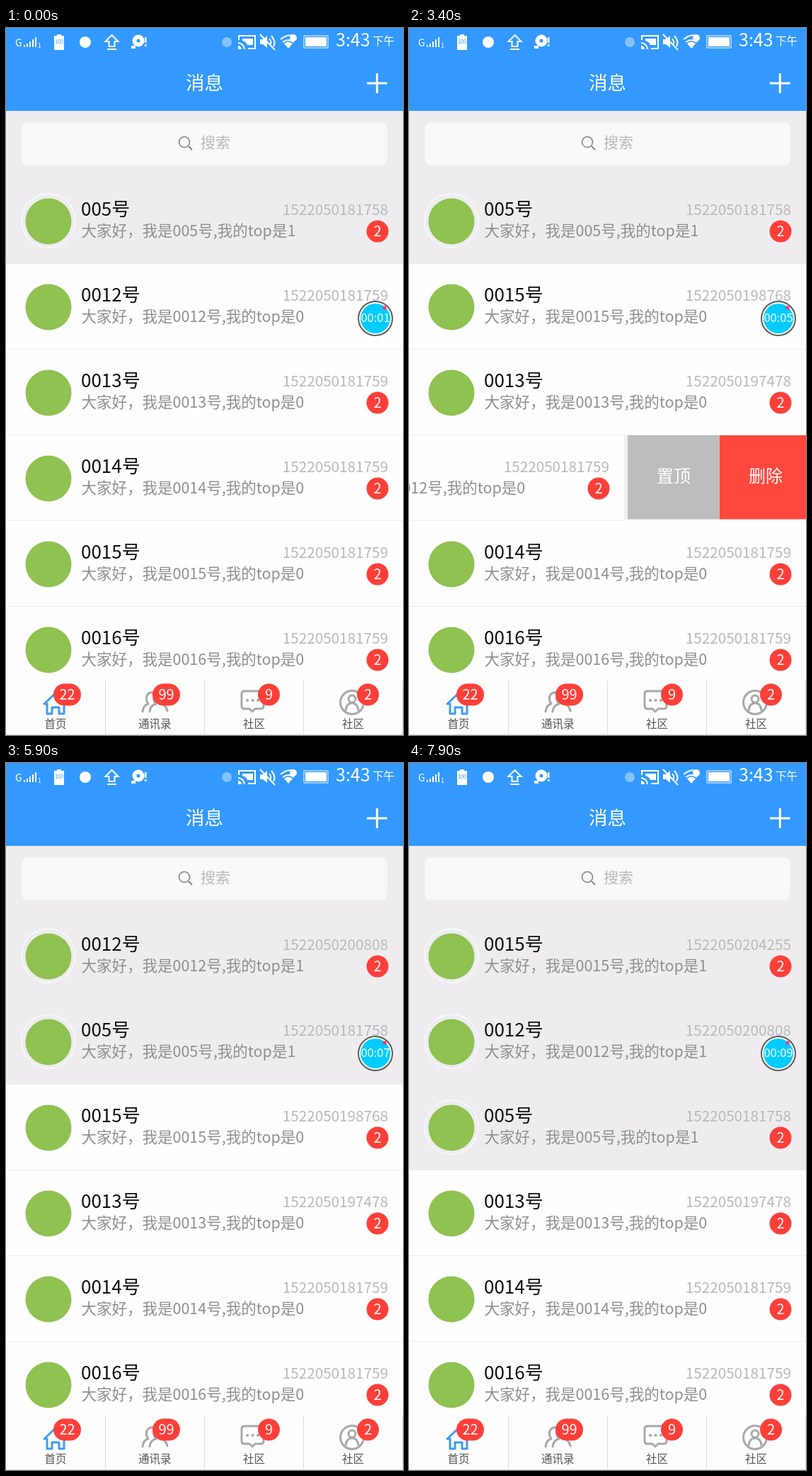
An HTML page that plays this animation: 561x998 px, repeating every 8000 ms.

```html
<!DOCTYPE html>
<html lang="zh-CN">
<head>
<meta charset="utf-8">
<title>消息</title>
<style>
  html, body { margin: 0; width: 100%; height: 100%; overflow: hidden; background: #fefefe; }
  svg { display: block; width: 100%; height: 100%; }
  text { font-family: "Noto Sans CJK SC", "Noto Sans", sans-serif; font-weight: 300; }
  .mid { text-anchor: middle; }
  .end { text-anchor: end; }
  .white { fill: #fff; }
  .line { fill: none; stroke: #fff; stroke-width: 2; }
  .gray { fill: none; stroke: #a9a9ab; stroke-width: 3; stroke-linecap: round; stroke-linejoin: round; }
</style>
</head>
<body>
<svg viewBox="0 0 561 998">
  <rect width="561" height="998" fill="#fefefe"/>
  <rect y="117" width="561" height="95" fill="#eeecef"/>
  <rect width="561" height="117" fill="#3399ff"/>

  <!-- status bar -->
  <g class="white">
    <text x="13" y="26" font-size="14">G</text>
    <path d="M25 24h2v3h-2zM29 22h2v5h-2zM33 19h2v8h-2zM37 16h2v11h-2zM41 13h2v14h-2z"/>
    <text x="45" y="28" font-size="9">1</text>
    <path d="M72 9h6v2h4v20h-14v-20h4z"/>
    <circle cx="112" cy="20" r="8"/>
    <circle cx="187" cy="18" r="8.5"/>
    <path d="M177 25h6v4h-6zM196 13h2.5v8h-2.5zM196 23h2.5v3h-2.5z"/>
    <circle cx="312" cy="20" r="7" opacity=".4"/>
    <path d="M328 25a5 5 0 0 1 5 5h-5zM334 15h15v9h-8q-2-5-7-6z"/>
    <path d="M359 16h4l6-5v17l-6-5h-4z"/>
    <path d="M393 22q6-5 12 0l-6 7z"/>
    <circle cx="406" cy="14" r="5"/>
    <path d="M423 13h30v13h-30z"/>
    <text x="466" y="26" font-size="25">3:43</text>
    <text x="518" y="24" font-size="15.5">下午</text>
  </g>
  <text class="mid" x="75" y="22" font-size="7" fill="#3399ff">100</text>
  <circle cx="187" cy="18" r="2.5" fill="#3399ff"/>
  <g class="line">
    <path d="M149.500 10l9 9h-5v7h-8v-7h-5zM143 30h13"/>
    <path d="M329 17v-6h23v18h-10M328 21q8 1 9 9"/>
    <path d="M359 9l21 22M372 15q4 5 1 9M375 11q7 8 3 15"/>
    <path d="M388 16q10-8 17-5M391 20q8-6 16 0"/>
    <path d="M421 11h34v17h-34z" stroke-width="1"/>
    <path d="M510 78h28.500M524.300 64v28" stroke-width="3"/>
  </g>
  <text class="mid white" x="280.500" y="86.500" font-size="26.500">消息</text>

  <!-- search -->
  <rect x="22.500" y="133.500" width="516" height="60" rx="8" fill="#f9f8fb"/>
  <path d="M258 167l5 5" stroke="#858585" stroke-width="2"/>
  <circle cx="252" cy="161" r="7.500" fill="none" stroke="#858585" stroke-width="1.600"/>
  <text x="275" y="169" font-size="21" fill="#b8b7ba">搜索</text>

  <g id="list"></g>

  <!-- recording clock -->
  <circle cx="522" cy="410" r="24" fill="#fff" stroke="#5c5c5c" stroke-width="2"/>
  <circle cx="522" cy="410" r="21" fill="#00ccff"/>
  <circle cx="535" cy="395" r="2.700" fill="#f0397f"/>
  <text id="clock" class="mid white" x="522" y="415" font-size="16.500"></text>

  <!-- tab bar -->
  <rect y="920" width="561" height="78" fill="#fdfdfd"/>
  <path d="M0 997.500h561M140.500 921v77M280.500 921v77M420.500 921v77M560.500 921v77" stroke="#dcdcdc"/>
  <path class="gray" style="stroke:#3f9bf8" d="M54 954l16-15 16 15h-4v14h-7v-9h-10v9h-7v-14z"/>
  <g class="gray">
    <path d="M193 965q1-9 8-11q-5-7-1-13q4-5 9-2M203 965q1-9 9-11q-6-7-2-13q6-7 12 0q4 6-2 13q6 2 8 10"/>
    <path d="M337 936h23q4 0 4 4v17q0 4-4 4h-8l-4 4-4-4h-7q-4 0-4-4v-17q0-4 4-4z"/>
    <path d="M341 949h.1M348.500 949h.1M356 949h.1" stroke-width="4"/>
    <circle cx="489" cy="952" r="16.500"/>
    <circle cx="489" cy="947" r="5"/>
    <path d="M480 963q1-10 9-10t9 10"/>
  </g>
  <g id="tabs"></g>
</svg>
<script>
const LOOP = 8000, STEP = 100, ROW = 121, TOP = 212, OPEN = 265;
const get = id => document.getElementById(id);

// [time, item, new stamp, pinned]
const events = [
  [1200, '0013', 197478, 0],
  [2500, '0015', 198768, 0],
  [4600, '0012', 200808, 1],
  [6300, '0015', 202636, 0],
  [7900, '0015', 204255, 1]
];
const swipes = [
  { id: '0012', open: 3050, close: 3950 },
  { id: '0015', open: 6700, close: 7450 }
];

const clamp = v => Math.max(0, Math.min(1, v));
const easeOut = (t, start, span, power) => 1 - (1 - clamp((t - start) / span)) ** power;

const label = (x, y, size, fill, str, cls = '') =>
  `<text x="${x}" y="${y}" font-size="${size}" fill="${fill}" class="${cls}">${str}</text>`;

const box = (x, y, w, h, fill, rx = 0) =>
  `<rect x="${x}" y="${y}" width="${w}" height="${h}" rx="${rx}" fill="${fill}"/>`;

const badge = (x, y, n, w = 31) =>
  box(x - w / 2, y - 15.5, w, 31, '#fe3f39', 15.5) + label(x, y + 7, 20, '#fff', n, 'mid');

function itemsAt(t) {
  const items = ['005', '0012', '0013', '0014', '0015', '0016'].map((id, i) =>
    ({ id, stamp: i ? 181759 : 181758, pinned: i ? 0 : 1 }));
  for (const [at, id, stamp, pinned] of events)
    if (t >= at) Object.assign(items.find(it => it.id === id), { stamp, pinned });
  return items.sort((a, b) => b.pinned - a.pinned || b.stamp - a.stamp);
}

function swipeAt(t, id) {
  const s = swipes.find(w => w.id === id && t > w.open && t < w.close + 400);
  if (!s) return null;
  const shown = easeOut(t, s.open, 600, 4), closed = easeOut(t, s.close, 400, 2);
  return {
    shift: OPEN * shown * (1 - closed),
    menu: OPEN * (1 - shown) + 28 * closed,
    alpha: 1 - closed ** 1.25
  };
}

const menu = ({ menu: x, alpha }) =>
  `<g transform="translate(${x} 0)" opacity="${alpha}">` +
  box(296, 0, 5, 119, '#f0eff1') +
  box(301, 0, 130, 118.5, '#bdbdbd') + label(366, 66, 24, '#fff', '置顶', 'mid') +
  box(431, 0, 130, 118.5, '#ff473d') + label(496, 66, 24, '#fff', '删除', 'mid') + '</g>';

function row({ id, stamp, pinned }, i, t) {
  const swipe = swipeAt(t, id);
  const ring = pinned ? '<circle cx="60" cy="60" r="38" fill="none" stroke="#fbfafc" stroke-width="1.3"/>' : '';
  const rule = pinned ? '' : box(0, 120, 561, 1, '#ececee');
  return `<g transform="translate(0 ${TOP + ROW * i})">` + (swipe ? menu(swipe) : '') +
    `<g transform="translate(${swipe ? -swipe.shift : 0} 0)">` +
    box(0, 0, 561, ROW, pinned ? '#eeecef' : '#fefefe') + rule + ring +
    '<circle cx="60" cy="61" r="32.5" fill="#8fc251"/>' +
    label(106, 53, 26, '#0c0c0c', id + '号') +
    label(106.5, 81.5, 21.5, '#8f8e90', `大家好，我是${id}号,我的top是${pinned}`) +
    label(540, 51.5, 20.7, '#b9b8ba', '1522050' + stamp, 'end') +
    badge(525, 75, 2) + '</g></g>';
}

get('tabs').innerHTML =
  ['首页', '通讯录', '社区', '社区'].map((s, i) => label(70 + 140.2 * i, 987.5, 15.5, '#555', s, 'mid')).join('') +
  badge(86.5, 941, 22, 39) + badge(226.5, 941, 99, 39) + badge(371.5, 941, 9) + badge(511.5, 941, 2);

let last = -1;
function draw() {
  const t = Math.floor(performance.now() % LOOP / STEP) * STEP;
  if (t !== last) {
    last = t;
    get('list').innerHTML = itemsAt(t).map((it, i) => row(it, i, t)).join('');
    get('clock').textContent = '00:0' + (t < 100 ? 1 : 2 + Math.floor(t / 1000));
  }
  requestAnimationFrame(draw);
}
draw();
</script>
</body>
</html>
```
